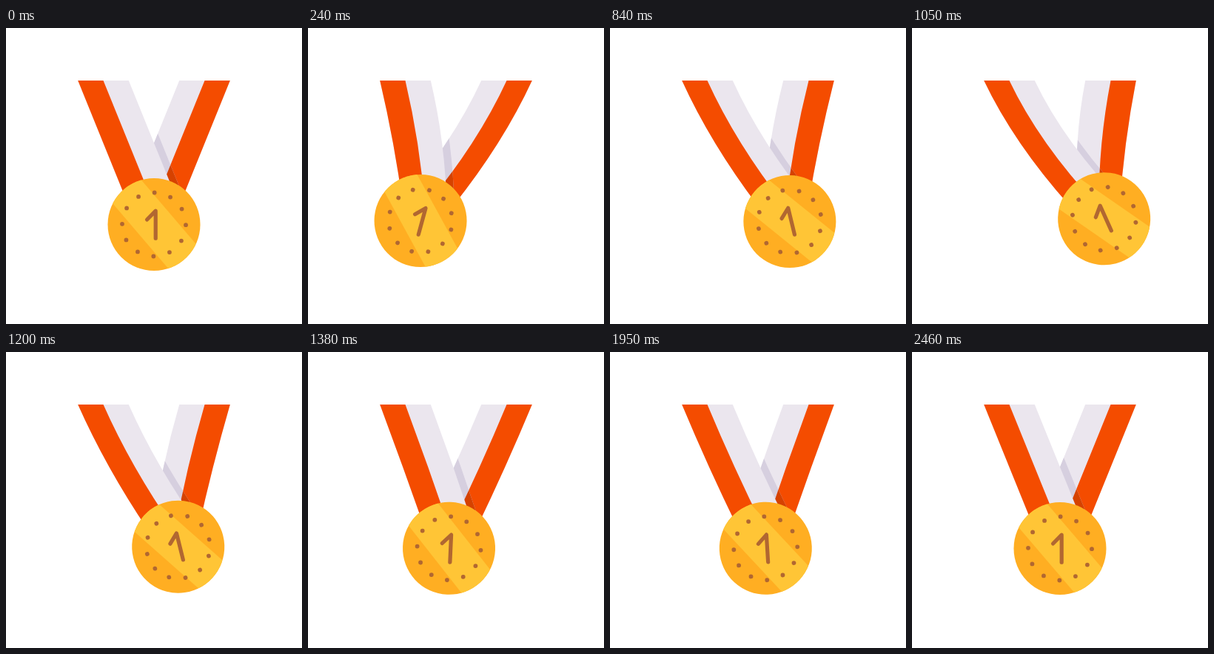
Recreate the animation shown at these times as an HTML page with a canvas. Size 400 by 400 pixels, loop 3.12 s.

```html
<!DOCTYPE html>
<html lang="en">
<head>
<meta charset="utf-8">
<title>Swinging medal</title>
<style>
  html, body { margin: 0; height: 100%; overflow: hidden; background: #fff; }
  canvas { display: block; width: 100vw; height: 100vh; }
</style>
</head>
<body>
<canvas width="400" height="400"></canvas>
<script>
const canvas = document.querySelector('canvas');
const ctx = canvas.getContext('2d');
const LOOP = 3120, STEP = 30, TAU = Math.PI * 2, RAD = Math.PI / 180;
const PIVOT_Y = 32, ARM = 233.5, RADIUS = 62.5;
const TOP = 71, END = 240, HALF = 34.3;
const COLORS = { orange: '#f44c00', white: '#ebe6ee' };
const SHADE = { orange: '#d64200', white: '#d6cfdf' };

const easeOut = x => 1 - (1 - x) ** 3;
const cubic = x => x < .5 ? 4 * x ** 3 : 1 - 4 * (1 - x) ** 3;
const sine = x => (1 - Math.cos(Math.PI * x)) / 2;

// Each key: time, angle in degrees, easing used to reach it
const SWING = [[0, 0], [555, 14.5, easeOut], [990, -15.5, cubic], [1500, 5, sine], [1980, -2.6, sine], [2460, 0, sine]];
const TWIST = [[0, 0], [570, 9, sine], [1020, -9.5, sine], [1500, 2, sine], [1980, -1, sine], [2460, 0, sine]];

function valueAt(keys, t) {
  const i = keys.findIndex(key => key[0] > t);
  if (i < 0) return keys[keys.length - 1][1];
  const [t0, a] = keys[i - 1], [t1, b, ease] = keys[i];
  return a + (b - a) * ease((t - t0) / (t1 - t0));
}

// Edges of a ribbon: k = -1 left, 0 middle, 1 right
function edge(side, k, x) {
  const slack = side * x > 0;
  const top = 200 + side * 68.5 + k * HALF;
  const width = HALF + Math.abs(x) * (slack ? -.1 : .06);
  return {
    top,
    mid: (top + 200 + k * HALF) / 2 + x * (slack ? .3 : .1),
    end: 200 + x * (slack ? .88 : .85) + k * width
  };
}

function band(side, k0, k1, x, dx = 0) {
  const a = edge(side, k0, x), b = edge(side, k1, x), my = (TOP + END) / 2;
  ctx.beginPath();
  ctx.moveTo(a.top + dx, TOP);
  ctx.quadraticCurveTo(a.mid + dx, my, a.end + dx, END);
  ctx.lineTo(b.end + dx, END);
  ctx.quadraticCurveTo(b.mid + dx, my, b.top + dx, TOP);
  ctx.closePath();
}

function ribbon(side, x, colors) {
  ctx.fillStyle = colors.white;
  band(side, -1, 1, x);
  ctx.fill();
  ctx.fillStyle = colors.orange;
  band(side, Math.min(side, 0), Math.max(side, 0), x);
  ctx.fill();
}

function disc(x, y, r, color) {
  ctx.fillStyle = color;
  ctx.beginPath();
  ctx.arc(x, y, r, 0, TAU);
  ctx.fill();
}

function medal(angle, twist) {
  ctx.save();
  ctx.translate(200, PIVOT_Y);
  ctx.rotate(angle);
  ctx.translate(0, ARM);
  disc(0, 0, RADIUS, '#ffae22');

  ctx.save();
  ctx.clip();
  ctx.rotate(49.5 * RAD);
  ctx.fillStyle = '#ffc536';
  ctx.fillRect(-70, -26, 140, 50);
  ctx.restore();

  ctx.rotate(twist);
  for (let i = 0; i < 12; i++) {
    const a = i * TAU / 12 + .015;
    disc(43 * Math.cos(a), 43 * Math.sin(a), 2.9, '#b16731');
  }
  ctx.strokeStyle = '#b16731';
  ctx.lineWidth = 5.2;
  ctx.lineCap = ctx.lineJoin = 'round';
  ctx.beginPath();
  ctx.moveTo(-9.5, -6.5);
  ctx.lineTo(2.2, -18.3);
  ctx.lineTo(2.2, 18.7);
  ctx.stroke();
  ctx.restore();
}

function draw(now) {
  const t = Math.floor(now % LOOP / STEP) * STEP;
  const angle = valueAt(SWING, t) * RAD;
  const x = -ARM * Math.sin(angle);
  ctx.clearRect(0, 0, 400, 400);
  ribbon(1, x, COLORS);
  ctx.save();
  band(-1, -1, 1, x, 10.3);
  ctx.clip();
  ribbon(1, x, SHADE);
  ctx.restore();
  ribbon(-1, x, COLORS);
  medal(angle, valueAt(TWIST, t) * RAD);
}

const start = performance.now();
function tick() {
  draw(performance.now() - start);
  requestAnimationFrame(tick);
}
tick();
</script>
</body>
</html>
```
